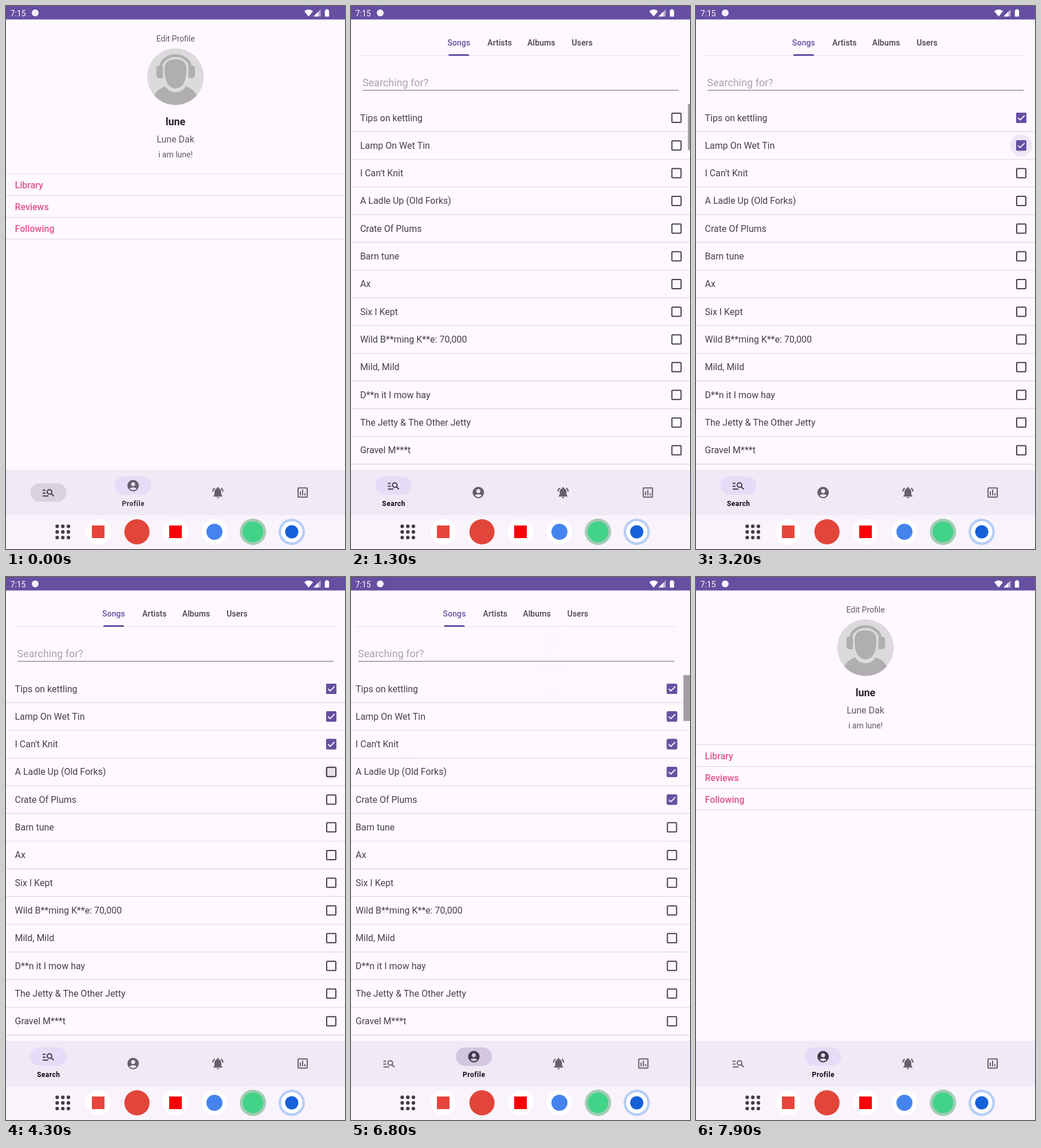
Write an HTML page with a canvas that moves like this. It is 592x947 px and loops after 8 s.

```html
<!DOCTYPE html>
<html lang="en">
<head>
<meta charset="utf-8">
<title>Music app</title>
<style>
html, body { margin: 0; width: 100%; height: 100%; overflow: hidden; background: #fef8ff; }
canvas { display: block; width: 592px; height: 947px; }
</style>
</head>
<body>
<canvas id="stage"></canvas>
<script>
const W = 592, H = 947, LOOP = 8000;
const PAGE_TOP = 23, BAR_TOP = 809, DOCK_TOP = 888;
const canvas = document.getElementById('stage');
const ctx = canvas.getContext('2d');
const dpr = window.devicePixelRatio || 1;
canvas.width = W * dpr;
canvas.height = H * dpr;

const PURPLE = '#664fa1', BG = '#fef8ff', INK = '#444048', GREY = '#5f5963';

const SONGS = ['Tips on kettling', 'Lamp On Wet Tin', "I Can't Knit", 'A Ladle Up (Old Forks)',
  'Crate Of Plums', 'Barn tune', 'Ax', 'Six I Kept', 'Wild B**ming K**e: 70,000', 'Mild, Mild',
  'D**n it I mow hay', 'The Jetty & The Other Jetty', 'Gravel M***t'];
const TAPS = [2250, 2970, 3600, 4260, 5200];
const TABS = [['Songs', 188], ['Artists', 259.3], ['Albums', 332], ['Users', 403.5]];
const ITEMS = [['Search', 74], ['Profile', 222], ['Alerts', 370], ['Stats', 518]];
const OPEN_SEARCH = 950, OPEN_PROFILE = 6750;

const clamp = v => Math.max(0, Math.min(1, v));
const ramp = (t, a, b) => clamp((t - a) / (b - a));
const smooth = v => v * v * (3 - 2 * v);
const bez = (s, a, b, c, d) => {
  const r = 1 - s;
  return r * r * r * a + 3 * r * r * s * b + 3 * r * s * s * c + s * s * s * d;
};

// Two joined curves: quick start, very slow finish.
function ease(u) {
  if (u <= 0) return 0;
  if (u >= 1) return 1;
  const [xs, ys] = u < 1 / 6
    ? [[0, .05, .13333, 1 / 6], [0, 0, .06, .4]]
    : [[1 / 6, .20833, .25, 1], [.4, .82, 1, 1]];
  let lo = 0, hi = 1;
  for (let i = 0; i < 30; i++) {
    const m = (lo + hi) / 2;
    if (bez(m, ...xs) < u) lo = m; else hi = m;
  }
  return bez(lo, ...ys);
}

function rect(x, y, w, h, color, r = 0) {
  ctx.fillStyle = color;
  ctx.beginPath();
  ctx.roundRect(x, y, w, h, r);
  ctx.fill();
}

function disc(x, y, r, color) {
  ctx.fillStyle = color;
  ctx.beginPath();
  ctx.arc(x, y, r, 0, Math.PI * 2);
  ctx.fill();
}

function line(points, color, width) {
  ctx.strokeStyle = color;
  ctx.lineWidth = width;
  ctx.beginPath();
  points.forEach(([x, y], i) => i ? ctx.lineTo(x, y) : ctx.moveTo(x, y));
  ctx.stroke();
}

function text(str, x, y, size, color, { weight = 400, align = 'left', space = 0 } = {}) {
  ctx.font = `${weight} ${size}px Roboto, sans-serif`;
  ctx.letterSpacing = space + 'px';
  ctx.textAlign = align;
  ctx.fillStyle = color;
  ctx.fillText(str, x, y);
}

function faded(alpha, draw) {
  if (alpha <= 0) return;
  ctx.save();
  ctx.globalAlpha *= alpha;
  draw();
  ctx.restore();
}

const PERSON = new Path2D('M12 2a10 10 0 1 0 0 20a10 10 0 1 0 0-20zm0 4a3.5 3.5 0 1 1 0 7a3.5 3.5 0 1 1 0-7zm0 14c-2.03 0-4.43-.82-6.14-2.88C7.55 15.8 9.68 15 12 15s4.45.8 6.14 2.12C16.43 19.18 14.03 20 12 20z');
const BELL = new Path2D('M18 11c0-3.07-1.64-5.64-4.5-6.32V4c0-.83-.67-1.5-1.5-1.5s-1.5.67-1.5 1.5v.68C7.63 5.36 6 7.92 6 11v5l-2 2v1h16v-1l-2-2zM10 20h4a2 2 0 0 1-4 0z');

// Each icon is drawn in a 24 by 24 box.
const ICONS = [
  c => {
    rect(2, 7, 5, 2, c);
    rect(2, 12, 5, 2, c);
    rect(2, 17, 10, 2, c);
    ctx.strokeStyle = c;
    ctx.lineWidth = 2;
    ctx.beginPath();
    ctx.arc(14, 11, 4, 0, 7);
    ctx.stroke();
    line([[16.7, 13.7], [21.3, 18.3]], c, 2);
  },
  c => { ctx.fillStyle = c; ctx.fill(PERSON, 'evenodd'); },
  c => {
    ctx.fillStyle = c;
    ctx.fill(BELL);
    ctx.strokeStyle = c;
    ctx.lineWidth = 2;
    for (const [from, to] of [[-3.06, -2.24], [-.9, -.08]]) {
      ctx.beginPath();
      ctx.arc(12, 11.2, 9, from, to);
      ctx.stroke();
    }
  },
  c => {
    ctx.strokeStyle = c;
    ctx.lineWidth = 2;
    ctx.beginPath();
    ctx.roundRect(4, 4, 16, 16, 1);
    ctx.stroke();
    rect(7, 10, 2, 7, c);
    rect(11, 7, 2, 10, c);
    rect(15, 13, 2, 4, c);
  }
];

// sel: how far each item is selected; pressed: index with a ripple; dim: colours already switched
function navBar(sel, pressed, dim) {
  rect(-80, BAR_TOP, W + 160, DOCK_TOP - BAR_TOP, '#f0e9f6');
  ITEMS.forEach(([label, x], i) => {
    const s = sel[i] || 0, cy = 848.5 - 12 * s;
    faded(s, () => rect(x - 31.5, cy - 16, 63, 32, '#e7dcf7', 16));
    if (pressed === i) rect(x - 31.5, cy - 16, 63, 32, 'rgba(28,20,34,.11)', 16);
    ctx.save();
    ctx.translate(x - 12, cy - 12);
    const strong = dim ? pressed === i : s > .5;
    ICONS[i](strong ? '#403947' : '#665e6d');
    ctx.restore();
    faded(s, () => text(label, x + .25, 872, 12, dim && i !== pressed ? '#37323b' : '#0c0a0d',
      { weight: 700, align: 'center', space: .5 }));
  });
}

function avatar() {
  const tone = '#b0aeb0';
  ctx.save();
  disc(296, 123.3, 49.3, '#dcdadc');
  ctx.beginPath();
  ctx.arc(296, 123.3, 49.3, 0, 7);
  ctx.clip();
  ctx.strokeStyle = tone;
  ctx.lineWidth = 5;
  ctx.beginPath();
  ctx.ellipse(296, 108, 26, 21.5, 0, Math.PI * 1.06, Math.PI * 1.94);
  ctx.stroke();
  rect(262.5, 104, 11.5, 22, tone, [5, 2, 2, 5]);
  rect(318.5, 104, 11.5, 22, tone, [2, 5, 5, 2]);
  ctx.fillStyle = tone;
  ctx.beginPath();
  ctx.moveTo(277, 112);
  ctx.bezierCurveTo(276.5, 97, 284, 93, 296, 93);
  ctx.bezierCurveTo(308, 93, 315.5, 97, 315, 112);
  ctx.bezierCurveTo(315, 133, 307, 143.5, 296, 143.5);
  ctx.bezierCurveTo(285, 143.5, 277, 133, 277, 112);
  ctx.fill();
  ctx.beginPath();
  ctx.moveTo(252, 180);
  ctx.bezierCurveTo(257, 150, 265, 146, 278, 140);
  ctx.bezierCurveTo(286, 154, 306, 154, 314, 140);
  ctx.bezierCurveTo(327, 146, 335, 150, 340, 180);
  ctx.fill();
  ctx.restore();
}

function profilePage() {
  rect(-80, PAGE_TOP, W + 160, BAR_TOP - PAGE_TOP, BG);
  const mid = { align: 'center' };
  text('Edit Profile', 296, 62.3, 14, GREY, mid);
  avatar();
  text('lune', 296, 208, 18, '#29252c', { weight: 700, align: 'center' });
  text('Lune Dak', 296, 237.6, 16, GREY, mid);
  text('i am lune!', 296, 264.3, 14, GREY, mid);
  for (let i = 0; i < 4; i++) rect(-80, 292 + 38 * i, W + 160, 1, '#dad3dc');
  ['Library', 'Reviews', 'Following'].forEach((s, i) =>
    text(s, 15.5, 318 + 38 * i, 16, '#df5589', { weight: 500 }));
}

function checkbox(y, dt) {
  const x = 568, on = ramp(dt, 90, 190);
  if (dt >= 0) {
    const r = 12 + 7.3 * smooth(ramp(dt, 20, 200));
    faded(1 - ramp(dt, 280, 520), () =>
      disc(x, y, r, dt < 90 ? 'rgba(40,32,48,.11)' : 'rgba(103,80,164,.11)'));
  }
  ctx.strokeStyle = INK;
  ctx.lineWidth = 2;
  ctx.beginPath();
  ctx.roundRect(x - 8, y - 8, 16, 16, 1.2);
  ctx.stroke();
  faded(on, () => {
    rect(x - 9, y - 9, 18, 18, PURPLE, 2);
    line([[x - 5.6, y + .2], [x - 2, y + 3.8], [x + 5.8, y - 4]], '#fff', 1.8);
  });
}

function searchPage(t) {
  rect(-80, PAGE_TOP, W + 160, BAR_TOP - PAGE_TOP, BG);
  rect(16, 86, 560, 1, '#e6dfe8');
  TABS.forEach(([s, x], i) => text(s, x, 68.8, 14, i ? INK : PURPLE,
    { weight: 500, align: 'center', space: .1 }));
  rect(170, 84, 36, 3, PURPLE, [2, 2, 0, 0]);
  text('Searching for?', 19.5, 139.8, 18, '#a9a3ab');
  rect(20, 146.4, 552, 1.2, '#625c66');
  SONGS.forEach((s, i) => {
    const y = 194.9 + i * 48.33;
    text(s, 15.5, y + 5.6, 16, INK);
    rect(-80, y + 23.4, W + 160, 1.4, '#e2dbe5');
    checkbox(y, i < TAPS.length ? t - TAPS[i] : -1);
  });
  const bar = t < 4000 ? 1 - ramp(t, 1700, 1950) : ramp(t, 6690, 6700);
  faded(bar, () => rect(588, 171, 84, 80, '#a29ba5'));
}

function slide(t, start, before, after) {
  const e = ease((t - start) / 450), shift = W * .1;
  const at = (x, draw) => {
    ctx.save();
    ctx.translate(x, 0);
    draw();
    ctx.restore();
  };
  const show = ramp(t, start + 50, start + 133);
  if (show < 1) at(-shift * e, before);
  faded(show, () => at(shift * (1 - e), after));
}

function app(t) {
  if (t < 4000) {
    const s = smooth(ramp(t, 20, 220));
    slide(t, OPEN_SEARCH,
      () => { profilePage(); navBar([s, 1 - s], 0, true); },
      () => { searchPage(t); navBar([1], -1); });
  } else {
    const s = smooth(ramp(t, 6420, 6600));
    slide(t, OPEN_PROFILE,
      () => { searchPage(t); navBar([1 - s, s], t > 6350 ? 1 : -1, t > 6400); },
      () => { profilePage(); navBar([0, 1], -1); });
  }
}

function statusBar() {
  rect(0, 0, W, 23.5, PURPLE);
  text('7:15', 7.7, 17.5, 14, '#fff');
  disc(51, 12, 6, '#f4f0fa');
  ctx.fillStyle = '#fff';
  ctx.beginPath();
  ctx.moveTo(528.5, 18.5);
  ctx.lineTo(520.8, 9);
  ctx.quadraticCurveTo(528.5, 3, 536.2, 9);
  ctx.fill();
  const wedge = (x, color) => {
    ctx.fillStyle = color;
    ctx.beginPath();
    ctx.moveTo(537, 18.3);
    ctx.lineTo(x, 18.3);
    ctx.lineTo(x, 18.3 - (x - 537));
    ctx.fill();
  };
  wedge(549.5, '#b9add4');
  wedge(545.5, '#fff');
  rect(556.8, 7, 7.4, 11.6, '#fff', 1);
  rect(558.8, 5.6, 3.4, 2, '#fff');
}

function dock() {
  rect(0, DOCK_TOP, W, H - DOCK_TOP, '#f9f3fc');
  for (let i = 0; i < 9; i++)
    disc(89.4 + (i % 3) * 9.8, 907.4 + Math.floor(i / 3) * 9.8, 3.1, '#423c47');
  const y = 917;
  for (const x of [161, 296, 364]) disc(x, y, 22, '#fff');
  rect(150, y - 11, 22, 22, '#e5453a');
  disc(228.7, y, 22, '#e2453a');
  rect(285, y - 11, 22, 22, '#fb0007');
  disc(364, y, 14, '#4584ee');
  disc(431.3, y, 23, '#a3ccb4');
  disc(431.3, y, 18, '#41d388');
  disc(499, y, 23, '#b7cef6');
  disc(499, y, 18.5, '#fff');
  disc(499, y, 11.5, '#1660d8');
}

function frame(now) {
  const t = now % LOOP;
  ctx.setTransform(dpr, 0, 0, dpr, 0, 0);
  app(t);
  statusBar();
  dock();
}

const began = performance.now();
function tick() {
  frame(performance.now() - began);
  requestAnimationFrame(tick);
}
tick();
</script>
</body>
</html>
```
